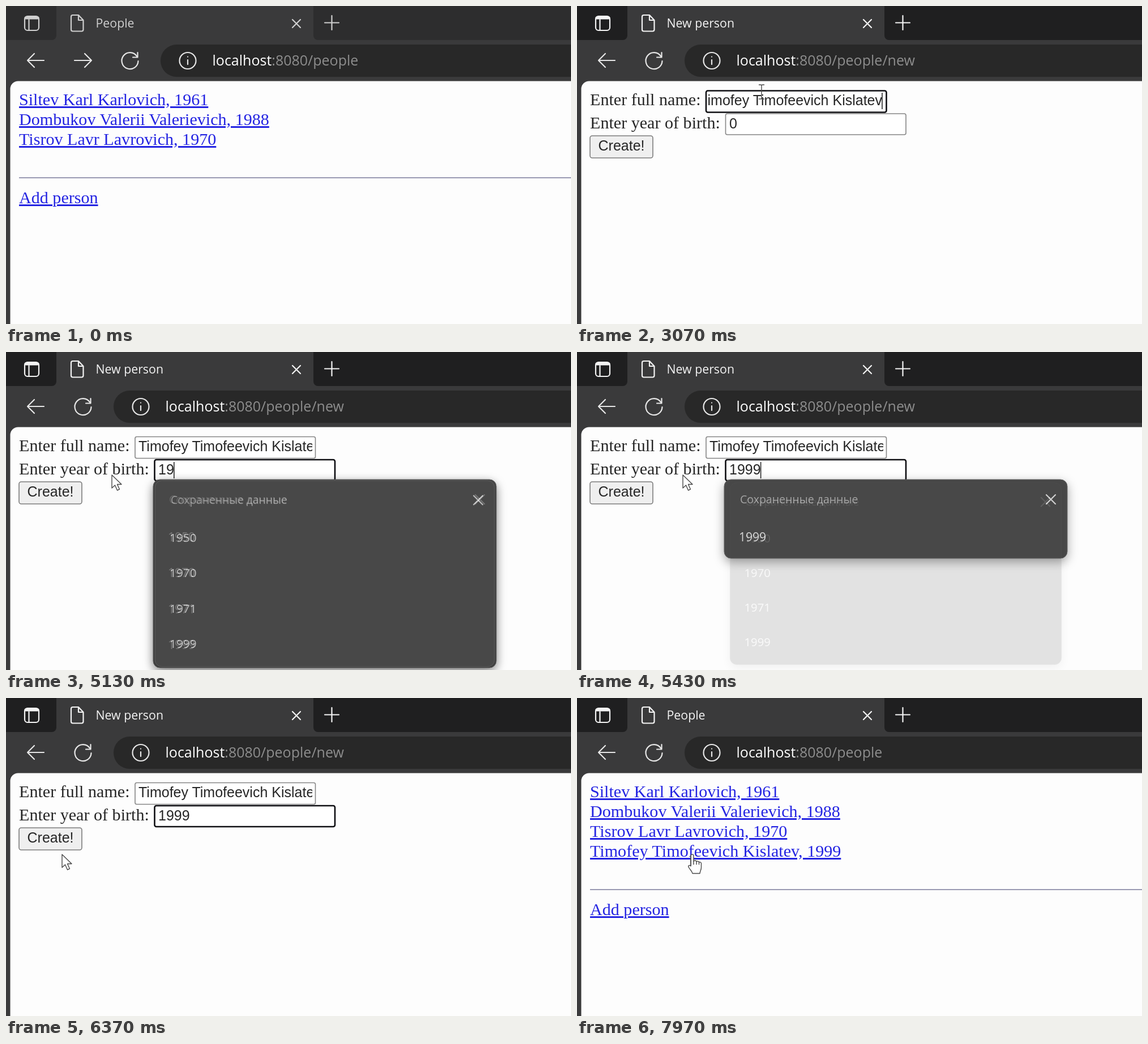
An HTML page that plays this animation: 998x561 px, repeating every 8 s.

```html
<!DOCTYPE html>
<html lang="en">
<head>
<meta charset="utf-8">
<title>People</title>
<style>
  html, body { margin: 0; width: 100%; height: 100%; overflow: hidden; background: #3a3a3b; }
  svg { display: block; width: 100vw; height: 100vh; }
  text { white-space: pre; }
  .ui { font-family: "Open Sans", sans-serif; }
  .serif { font: 30.1px "Liberation Serif", serif; fill: #262626; }
  .sans { font: 25px "Liberation Sans", sans-serif; fill: #262626; }
  .link { fill: #2424e2; text-decoration: underline 2px; text-underline-offset: 2px; }
  .line { fill: none; stroke: #e6e6e6; stroke-width: 2.2; stroke-linecap: round; stroke-linejoin: round; }
  .strip { fill: #1f1f20; }
  .tab .line { stroke: #f4f4f4; }
  .tab text { fill: #f4f4f4; font-size: 21.3px; font-weight: 500; }
  .inactive .strip { fill: #2d2d2e; }
  .inactive .tab .line { stroke: #cfcfcf; }
  .inactive .tab text { fill: #cfcfcf; }
  .field { fill: #fff; stroke: #858585; stroke-width: 1.6; }
  .field.focus { stroke: #0e0e12; stroke-width: 2.6; }
  .caret { stroke: #333; stroke-width: 1.7; }
  .popup { transform-box: fill-box; transform-origin: center; }
  .popup rect { fill: #484848; stroke: #656565; filter: drop-shadow(0 6px 9px rgba(0, 0, 0, .35)); }
  .popup .head { font-size: 19.5px; fill: #b4b4b4; }
  .popup .row { font-size: 21px; fill: #efefef; }
  .pointer path { fill: #fff; stroke: #484848; stroke-width: 1.4; stroke-linejoin: round; }
  .pointer .open { fill: none; }
</style>
</head>
<body>
<svg viewBox="0 0 998 561" preserveAspectRatio="none">
  <defs>
    <clipPath id="nameClip"><rect x="232" y="151" width="309" height="34"/></clipPath>
  </defs>

  <g id="browser">
    <rect width="998" height="561" fill="#3a3a3b"/>
    <rect class="strip" x="-12" y="-12" width="101" height="72" rx="8"/>
    <rect class="strip" x="543" y="-12" width="480" height="72" rx="8"/>
    <g class="tab">
      <rect class="line" x="33" y="18" width="25" height="25" rx="5"/>
      <path class="line" d="M35 21H56" stroke-linecap="butt" style="stroke-width: 5"/>
      <path class="line" d="M40.500 24V42"/>
      <path class="line" d="M118 16H128L136.500 25V41.500a3 3 0 0 1-3 3H118a3 3 0 0 1-3-3V19a3 3 0 0 1 3-3zM128 16V25H136.500"/>
      <text id="title" class="ui" x="158.500" y="38"></text>
      <path class="line" d="M506 24l14 14m0-14l-14 14M563 29.500h25M575.500 17v25"/>
    </g>
    <path class="line" d="M67 96H38M50 84L38 96L50 108"/>
    <path id="forward" class="line" d="M121 96H151M139 84L151 96L139 108"/>
    <g id="address">
      <path class="line" d="M231 88.500A14.500 14.500 0 1 0 233.500 97M232.500 82V90.500H224"/>
      <rect x="273" y="68" width="900" height="57" rx="28.500" fill="#282828"/>
      <circle class="line" cx="321" cy="96.500" r="14.500"/>
      <path class="line" d="M321 95V103M321 89.500v.1"/>
      <text class="ui" x="364.500" y="105" font-size="25" fill="#fff"><tspan font-weight="500">localhost</tspan><tspan id="path" fill="#8d8d8d"></tspan></text>
    </g>
    <path d="M7.500 561V146.500a14 14 0 0 1 14-14H998V561z" fill="#fdfdfd"/>
  </g>

  <g id="list">
    <g id="people"></g>
    <g id="footer">
      <path d="M23 303H998" stroke="#9a9ab2" stroke-width="2"/>
      <text class="serif link" x="23" y="348">Add person</text>
    </g>
  </g>

  <g id="form">
    <text class="serif" x="23" y="175">Enter full name:</text>
    <text class="serif" x="23" y="216">Enter year of birth:</text>
    <rect id="nameField" class="field" x="228" y="149.500" width="318.500" height="38" rx="3"/>
    <g clip-path="url(#nameClip)"><text id="nameText" class="sans" y="175"></text></g>
    <rect id="yearField" class="field" x="262.500" y="190" width="318.500" height="37" rx="3"/>
    <rect id="selection" x="269" y="194" width="14" height="29" fill="#0078d7"/>
    <text id="yearText" class="sans" x="269" y="216"></text>
    <path id="caret" class="caret" d="M0 0V29"/>
    <rect id="button" x="23" y="229" width="111" height="39" rx="4" stroke="#7c7c7c" stroke-width="1.600"/>
    <text class="sans" x="37.500" y="255">Create!</text>
    <g id="popups"></g>
  </g>

  <g id="pointer" class="pointer">
    <path id="arrow" d="M0 0v23l5.500-5 4 9 4-1.800-4-8.700h7.500z"/>
    <g id="hand">
      <path d="M-3 2.500c0-3.500 5-3.500 5 0v9.500c1-2 5-1.500 5 .8 1-1.600 4.500-1 4.500 1.200 1-1.200 4-.6 4 2v7c0 4-2 6-2.500 10.500h-13c-.5-4-4-6-6.500-10.500-2-3.500 1-5 3.500-2.500z"/>
      <path class="open" d="M-3 20V3M2 12v6M7 13v5M11.500 14v4"/>
    </g>
    <path id="beam" class="open" d="M-5-12h4l1 1 1-1h4M0-11V12M-5 13h4l1-1 1 1h4"/>
  </g>
</svg>

<script>
const LOOP = 8000;
const NEW_PERSON = 'Timofey Timofeevich Kislatev';
const PEOPLE = [
  'Siltev Karl Karlovich, 1961',
  'Dombukov Valerii Valerievich, 1988',
  'Tisrov Lavr Lavrovich, 1970',
  NEW_PERSON + ', 1999'
];

// Moments in ms
const ACTIVATE = 1500, OPEN_FORM = 1800, FOCUS_NAME = 2900, PASTE = 2990;
const FOCUS_YEAR = 3700, SELECT_ZERO = 3900, SUBMIT = 7000;
const YEAR_KEYS = [[0, '0'], [4780, '1'], [5040, '19'], [5240, '199'], [5390, '1999']];
const POINTER = [
  [350, 190, 580], [850, 116, 330], [2580, 116, 330], [2850, 326, 151],
  [3430, 326, 151], [3700, 300, 207], [4100, 187, 217], [5980, 187, 217],
  [6320, 99, 276], [6450, 99, 276], [6720, 84, 250], [7100, 84, 250],
  [7480, 150, 378], [7600, 155, 378], [7900, 204, 276], [8000, 204, 276]
];
const ALL_YEARS = ['1950', '1970', '1971', '1999'];
const POPUPS = [
  { rows: ALL_YEARS, from: 4850, to: 5090, fadeIn: 120 },
  { rows: ALL_YEARS, from: 5090, to: 5302, fadeIn: 0 },
  { rows: ['1999'], from: 5302, to: 5720, fadeIn: 0 }
];
const POPUP_EXIT = 150;

const $ = id => document.getElementById(id);
const clamp = v => Math.max(0, Math.min(1, v));
const ease = p => p * p * (3 - 2 * p);
const show = (el, on) => el.style.display = on ? '' : 'none';
const inside = ([x, y], left, top, right, bottom) => x >= left && x <= right && y >= top && y <= bottom;

$('people').innerHTML = PEOPLE.map((name, i) =>
  `<text class="serif link" x="23" y="${175 + 35 * i}">${name}</text>`).join('');
const personLinks = [...$('people').children];

// A closing popup lies above its successor.
for (const popup of [...POPUPS].reverse()) {
  const height = popup.rows.length > 1 ? 332 : 139;
  const rows = popup.rows.map((year, i) =>
    `<text class="ui row" x="286" y="${334 + 63.3 * i}">${year}</text>`).join('');
  $('popups').insertAdjacentHTML('beforeend', `<g class="popup">
    <rect x="260" y="225" width="606" height="${height}" rx="12"/>
    <text class="ui head" x="288" y="267">Сохраненные данные</text>
    <path class="line" d="M829 252l16 16m0-16l-16 16"/>${rows}</g>`);
  popup.el = $('popups').lastElementChild;
}

function pointerAt(t) {
  let i = POINTER.findIndex(key => key[0] > t);
  if (i < 1) i = 1;
  const [t0, x0, y0] = POINTER[i - 1], [t1, x1, y1] = POINTER[i];
  const p = ease(clamp((t - t0) / (t1 - t0)));
  return [x0 + (x1 - x0) * p, y0 + (y1 - y0) * p];
}

function pointerKind(pos, onForm, count) {
  if (onForm) {
    return inside(pos, 228, 149, 547, 188) || inside(pos, 262, 190, 581, 227) ? 'beam' : 'arrow';
  }
  const shift = 35 * (count - 3);
  const overLink = inside(pos, 23, 151, 420, 255 + shift) || inside(pos, 23, 324 + shift, 163, 358 + shift);
  return overLink ? 'hand' : 'arrow';
}

function renderForm(t, pos) {
  const onName = t >= FOCUS_NAME && t < FOCUS_YEAR, onYear = t >= FOCUS_YEAR;
  const pasted = t >= PASTE;
  $('nameField').classList.toggle('focus', onName);
  $('yearField').classList.toggle('focus', onYear);

  const scrolled = pasted && onName;
  $('nameText').textContent = pasted ? NEW_PERSON : '';
  $('nameText').setAttribute('x', scrolled ? 539 : 234);
  $('nameText').setAttribute('text-anchor', scrolled ? 'end' : 'start');

  const [keyTime, year] = YEAR_KEYS.filter(key => key[0] <= t).pop();
  const selected = t >= SELECT_ZERO && year === '0';
  $('yearText').textContent = year;
  $('yearText').style.fill = selected ? '#fff' : '';
  show($('selection'), selected);

  const lastEdit = onYear ? Math.max(FOCUS_YEAR, keyTime) : pasted ? PASTE : FOCUS_NAME;
  const caretOn = (t - lastEdit) % 1060 < 530;
  show($('caret'), (onName || onYear && !selected) && caretOn);
  const caretX = onYear ? 269 + 13.9 * year.length : pasted ? 539 : 234;
  $('caret').setAttribute('transform', `translate(${caretX} ${onYear ? 194 : 153})`);

  $('button').setAttribute('fill', inside(pos, 23, 229, 134, 268) ? '#e4e4e4' : '#efefef');

  for (const { el, from, to, fadeIn } of POPUPS) {
    const enter = fadeIn ? clamp((t - from) / fadeIn) : 1;
    const leave = clamp((t - to) / POPUP_EXIT);
    show(el, t >= from && leave < 1);
    el.style.opacity = enter * (1 - leave);
    el.style.transform = `scale(${1 - 0.04 * Math.max(1 - enter, leave)})`;
  }
}

function render(t) {
  const onForm = t >= OPEN_FORM && t < SUBMIT;
  const count = t >= SUBMIT ? 4 : 3;
  const pos = pointerAt(t);

  $('browser').classList.toggle('inactive', t < ACTIVATE);
  $('title').textContent = onForm ? 'New person' : 'People';
  $('path').textContent = ':8080/people' + (onForm ? '/new' : '');
  show($('forward'), t < OPEN_FORM);
  $('address').setAttribute('transform', `translate(${t < OPEN_FORM ? 0 : -83} 0)`);

  show($('list'), !onForm);
  show($('form'), onForm);
  personLinks.forEach((el, i) => show(el, i < count));
  $('footer').setAttribute('transform', `translate(0 ${35 * (count - 3)})`);
  if (onForm) renderForm(t, pos);

  const kind = pointerKind(pos, onForm, count);
  for (const id of ['arrow', 'hand', 'beam']) show($(id), id === kind);
  $('pointer').setAttribute('transform', `translate(${pos})`);
}

const start = performance.now();
function tick() {
  render((performance.now() - start) % LOOP);
  requestAnimationFrame(tick);
}
tick();
</script>
</body>
</html>
```
